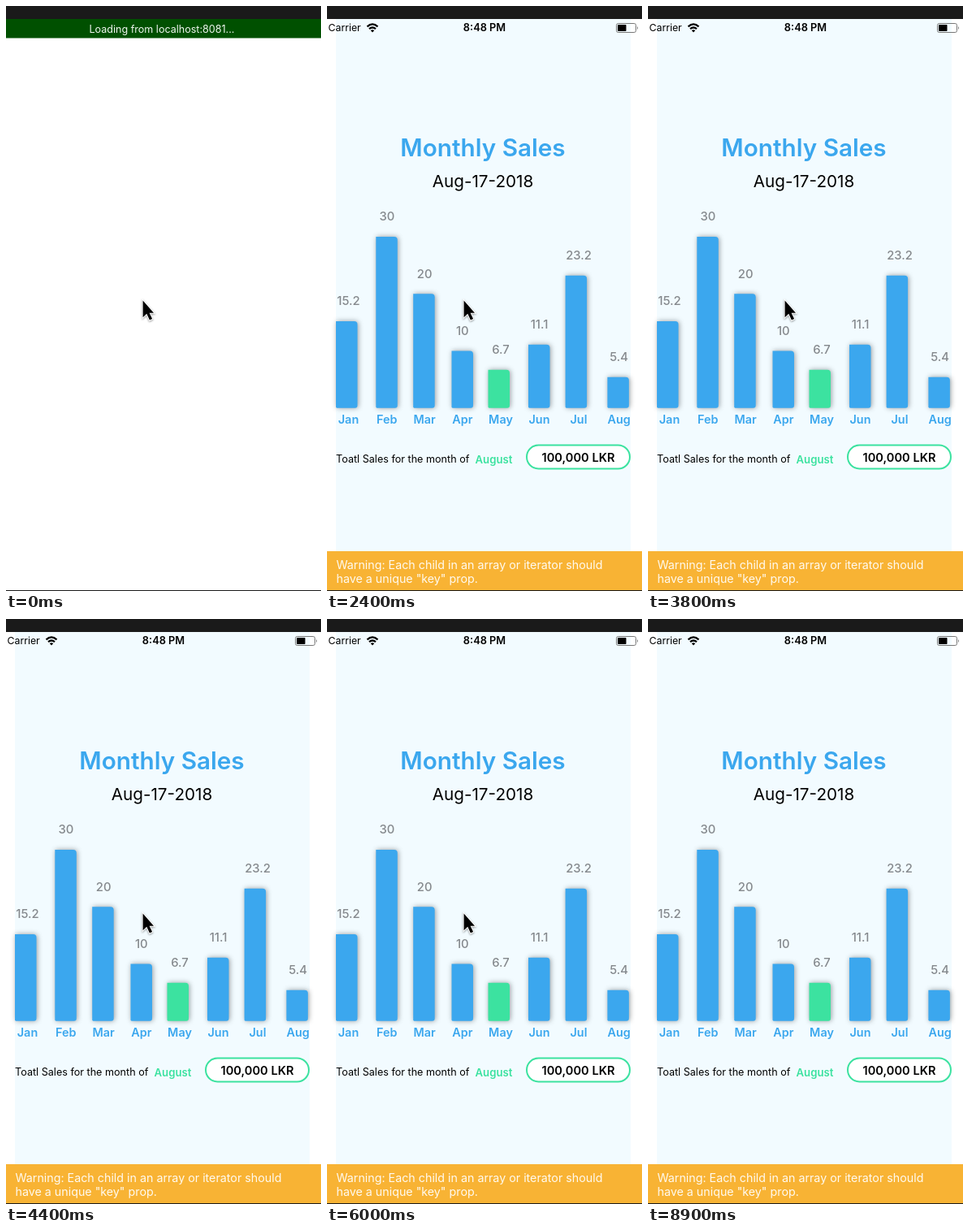
Animation, 388 px wide and 720 px high, one loop 9 s. Source, as an HTML page:

```html
<!DOCTYPE html>
<html lang="en">
<head>
<meta charset="utf-8">
<title>Monthly sales</title>
<style>
  html, body { margin: 0; width: 100%; height: 100%; overflow: hidden; background: #fff; }
  svg { display: block; width: 388px; height: 720px; font: 12.3px Inter, "Open Sans", sans-serif; }
  .mid { text-anchor: middle; }
  .semi { font-weight: 600; }
  .blue { fill: #3ba7ee; }
  .green { fill: #3ce2a0; }
  .value { font-size: 14.8px; font-weight: 500; fill: #85898d; }
  .month { font-size: 14.4px; font-weight: 600; }
  .bar { filter: drop-shadow(1px 0 3px rgba(0, 0, 0, .38)); }
  #cursor { filter: drop-shadow(0 1px 1.2px rgba(0, 0, 0, .4)); }
</style>
</head>
<body>
<svg viewBox="0 0 388 720">
  <rect width="388" height="720" fill="#fff"/>

  <g id="loading">
    <rect y="16" width="388" height="23.5" fill="#005000"/>
    <text id="status" class="mid" x="192" y="32.6" font-size="12.55" fill="#eef5ee"></text>
  </g>

  <g id="app">
    <rect x="11" y="16" width="363" height="704" fill="#f2fbff"/>
    <text x="1.5" y="31.4">Carrier</text>
    <g fill="none" stroke="#000" stroke-width="2.2">
      <path d="M49.5 25.3Q56 19.6 62.5 25.3M52 28.2Q56 24.8 60 28.2"/>
      <path d="M56 32.6l-2.3-2.6Q56 28.4 58.3 30z" fill="#000" stroke="none"/>
    </g>
    <text class="mid semi" x="194" y="31.4" font-size="12.8">8:48 PM</text>
    <rect x="356.5" y="21.5" width="24" height="11" rx="2.2" fill="none" stroke="#777"/>
    <rect x="358" y="23" width="10.5" height="8" rx=".8"/>
    <path d="M382 25q2 2 0 4z" fill="#777"/>

    <text class="mid semi blue" x="192" y="185" font-size="29.7">Monthly Sales</text>
    <text class="mid" x="192" y="223.3" font-size="20.7">Aug-17-2018</text>
    <g id="chart"></g>

    <text x="11.1" y="562" font-size="12.6">Toatl Sales for the month of</text>
    <text class="semi green" x="182.5" y="563" font-size="13.2">August</text>
    <rect x="246" y="540.5" width="127" height="29" rx="14.5" fill="#fff" stroke="#3ce2a0" stroke-width="2"/>
    <text class="mid semi" x="309.5" y="560.6" font-size="14.6">100,000 LKR</text>

    <rect y="671" width="388" height="49" fill="#f8b334"/>
    <g font-size="14.27" fill="#fffaf0">
      <text x="11.5" y="692.6">Warning: Each child in an array or iterator should</text>
      <text x="11.5" y="710.4">have a unique "key" prop.</text>
    </g>
  </g>

  <rect width="388" height="16" fill="#1a1a1a"/>
  <rect y="719" width="388" height="1" fill="#1a1a1a"/>
  <path id="cursor" d="M168.6 362.5v20.7l4.7-4.4 3.6 7.8 3.2-1.5-3.5-7.4h5.4z"
        stroke="#fff" stroke-width="2" paint-order="stroke"/>
</svg>
<script>
const $ = id => document.getElementById(id);
const LOOP = 9000, STEP = 100;
const BASE = 494.8, SCALE = 7.03, BAR_WIDTH = 26.5;

// month, sales, left edge of the bar, centre of the labels
const sales = [
  ['Jan', 15.2, 11, 26.5], ['Feb', 30, 60.3, 73.8], ['Mar', 20, 106.2, 120.2],
  ['Apr', 10, 153.5, 166.8], ['May', 6.7, 198.5, 214], ['Jun', 11.1, 248, 261.5],
  ['Jul', 23.2, 293.6, 310], ['Aug', 5.4, 345.4, 359.7]
];

// square on the left, rounded on the right
const barPath = (x, top) =>
  `M${x} ${top}h${BAR_WIDTH - 4}q4 0 4 4V${BASE - 3}q0 3-3 3H${x + 1}l-1-1z`;

$('chart').innerHTML = sales.map(([month, value, left, mid]) => {
  const top = BASE - value * SCALE;
  const color = month === 'May' ? 'green' : 'blue';
  return `<path class="bar ${color}" d="${barPath(left, top)}"/>
    <text class="mid value" x="${mid}" y="${top - 19.6}">${value}</text>
    <text class="mid month blue" x="${mid}" y="514">${month}</text>`;
}).join('');

// start and end of each reload
const reloads = [[0, 400], [3100, 3400], [5400, 5700]];
const CURSOR_GONE = 8600, MODULES = 2239;

function progress(elapsed) {
  if (elapsed < STEP) return 'Loading from localhost:8081...';
  const share = elapsed < 2 * STEP ? 0.76 : 1;
  return `Downloading JavaScript bundle ${share * 100}% (${Math.round(share * MODULES)}/${MODULES})...`;
}

const show = (id, on) => { $(id).style.display = on ? '' : 'none'; };

function draw() {
  const t = performance.now() % LOOP;
  const reload = reloads.find(([start, end]) => t >= start && t < end);
  show('loading', reload);
  show('app', !reload);
  show('cursor', t < CURSOR_GONE);
  if (reload) $('status').textContent = progress(t - reload[0]);
  requestAnimationFrame(draw);
}
draw();
</script>
</body>
</html>
```
